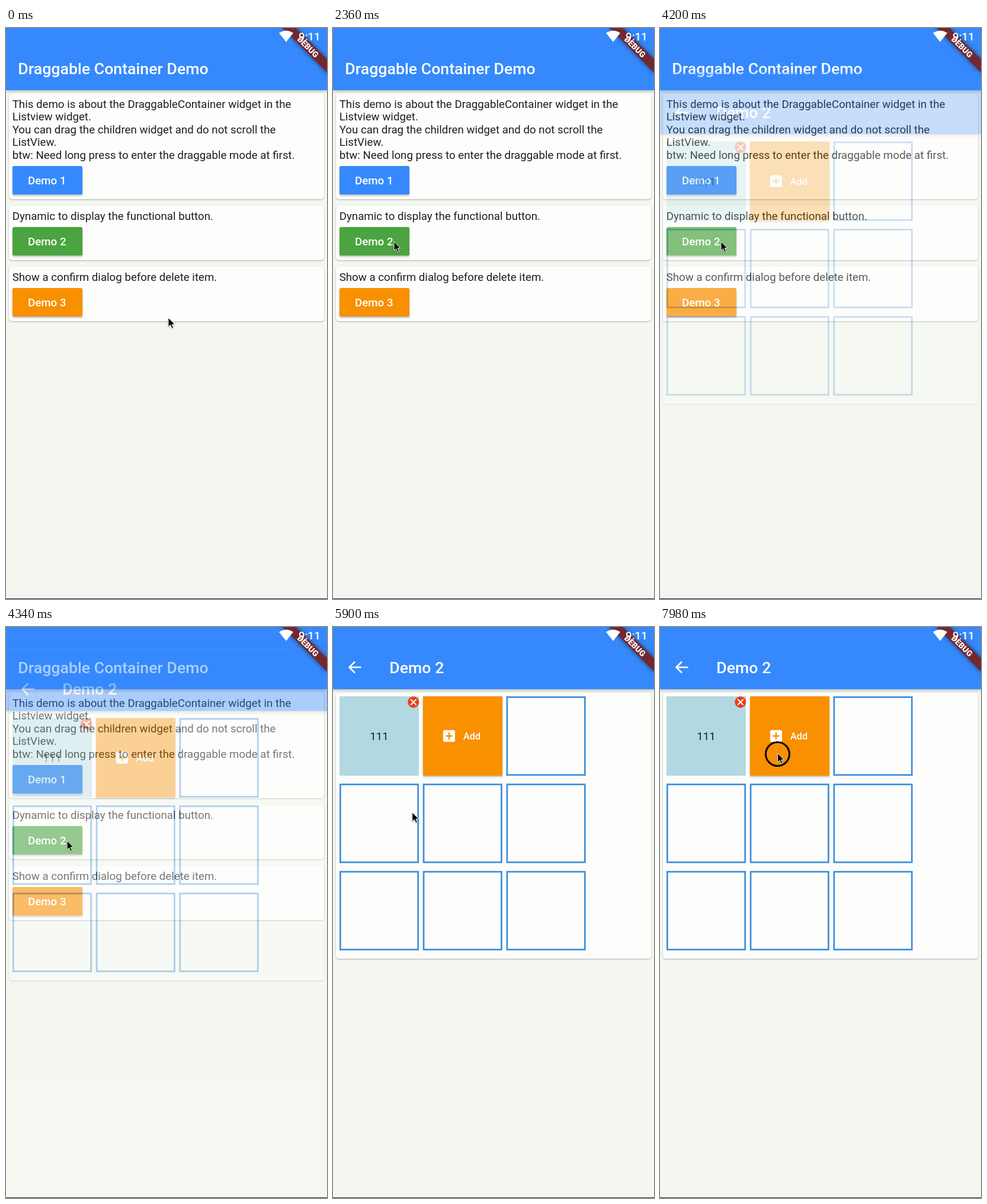
Write an HTML page that moves like this. It is 542 by 964 pixels and loops after 8 s.

```html
<!DOCTYPE html>
<html lang="en">
<head>
<meta charset="utf-8">
<title>Draggable Container Demo</title>
<style>
  html, body { margin: 0; width: 100%; height: 100%; overflow: hidden; background: #f4f7ef; }
  svg { display: block; width: 542px; height: 964px; font-family: Roboto, sans-serif; }
  .page { fill: #f4f7ef; }
  .bar { fill: #3589fc; filter: drop-shadow(0 2px 2.5px rgba(0, 0, 0, .25)); }
  .card { fill: #fdfdfc; filter: drop-shadow(0 1px 1px rgba(0, 0, 0, .3)); }
  .raised { filter: drop-shadow(0 2px 1.5px rgba(0, 0, 0, .28)); }
  .title { font-size: 26.7px; font-weight: 500; fill: #fff; }
  .body { font-size: 18.72px; fill: #1f1f1c; }
  .label { font-size: 18.72px; font-weight: 500; fill: #fff; }
  .slot { fill: none; stroke: #3b8fdc; stroke-width: 2.7; }
  .banner { fill: #73282f; filter: drop-shadow(0 0 4px rgba(0, 0, 0, .5)); }
</style>
</head>
<body>
<svg viewBox="0 0 542 964">
  <defs>
    <clipPath id="buttonClip"><rect x="11" y="336" width="118" height="48" rx="2.6"/></clipPath>
  </defs>

  <g id="home">
    <rect class="page" width="542" height="964"/>
    <rect class="bar" width="542" height="105"/>
    <text class="title" x="20.3" y="77.5">Draggable Container Demo</text>
  </g>

  <g id="detail">
    <rect class="page" width="542" height="964"/>
    <rect class="bar" width="542" height="105"/>
    <path d="M47.5 68H28M37 58.5 27.5 68l9.5 9.5" fill="none" stroke="#fff" stroke-width="2.6"/>
    <text class="title" x="95.300" y="77.5">Demo 2</text>
    <rect class="card" x="5" y="111" width="532" height="449" rx="5"/>
    <rect x="11" y="117" width="134" height="134" fill="#b2d9e2"/>
    <text class="body" x="78" y="191" text-anchor="middle">111</text>
    <circle cx="135.8" cy="126.8" r="9.6" fill="#e5421f"/>
    <path d="M131 122l9.6 9.6M140.600 122l-9.6 9.6" stroke="#fff" stroke-width="1.9"/>
    <rect class="raised" x="152" y="117" width="134" height="134" fill="#f89000"/>
    <rect x="186" y="174" width="20" height="20" rx="2.5" fill="#fff"/>
    <path d="M190.500 184h11M196 178.500v11" stroke="#f89000" stroke-width="2.4"/>
    <text x="220" y="190" font-size="16.2" font-weight="500" fill="#fff">Add</text>
  </g>

  <rect y="963" width="542" height="1" fill="#222"/>

  <g transform="translate(542 0) rotate(45)">
    <rect class="banner" x="-53.6" y="37.2" width="107.2" height="16"/>
    <text y="50.1" text-anchor="middle" font-size="13.7" font-weight="900" fill="#fff">DEBUG</text>
  </g>
  <path d="M461 8.500Q473 .5 485 8.500L473 23.500Z" fill="#fff"/>
  <text x="494" y="21" font-size="18.7" font-weight="500" fill="#fff">9:11</text>

  <g id="pointer">
    <circle id="press" cx="0" cy="1.500" r="20" fill="none" stroke="#000" stroke-width="3"/>
    <path d="M0 0V15.500L3.600 12.200 6.200 18 8.700 16.900 6.200 11.300H11Z"
      fill="#000" stroke="#fff" stroke-width="1" style="filter: drop-shadow(0 1px 1px rgba(0,0,0,.3))"/>
  </g>
</svg>

<script>
const LOOP = 8000;
const byId = id => document.getElementById(id);

function add(parent, tag, attrs, text) {
  const node = document.createElementNS(parent.namespaceURI, tag);
  for (const key in attrs) node.setAttribute(key, attrs[key]);
  if (text) node.textContent = text;
  return parent.appendChild(node);
}

const cards = [
  { y: 111, height: 178, color: '#3589fc', lines: [
    'This demo is about the DraggableContainer widget in the',
    'Listview widget.',
    'You can drag the children widget and do not scroll the',
    'ListView.',
    'btw: Need long press to enter the draggable mode at first.'] },
  { y: 300, height: 92, color: '#4aa43f', lines: ['Dynamic to display the functional button.'] },
  { y: 403, height: 92, color: '#f89000', lines: ['Show a confirm dialog before delete item.'] }
];

const home = byId('home');
let ripple;
cards.forEach(({ y, height, color, lines }, i) => {
  add(home, 'rect', { class: 'card', x: 5, y, width: 532, height, rx: 5 });
  lines.forEach((line, k) => add(home, 'text', { class: 'body', x: 10.7, y: y + 24 + k * 21.4 }, line));
  const top = y + height - 56;
  add(home, 'rect', { class: 'raised', x: 11, y: top, width: 118, height: 48, rx: 2.6, fill: color });
  if (i === 1) {
    const clip = add(home, 'g', { 'clip-path': 'url(#buttonClip)' });
    ripple = add(clip, 'circle', { cx: 103, cy: 361, fill: '#fff' });
  }
  add(home, 'text', { class: 'label', x: 69.3, y: top + 30.7, 'text-anchor': 'middle' }, `Demo ${i + 1}`);
});

const detail = byId('detail');
for (let i = 2; i < 9; i++) {
  add(detail, 'rect', {
    class: 'slot', x: 12.3 + (i % 3) * 140.8, y: 118.4 + Math.floor(i / 3) * 147.4, width: 131.4, height: 131.4
  });
}

const progress = (n, from, to) => Math.min(1, Math.max(0, (n - from) / (to - from)));
const smooth = u => u * u * (3 - 2 * u);

// cubic-bezier(.4, 0, .2, 1)
function fastOutSlowIn(x) {
  let low = 0, high = 1;
  for (let i = 0; i < 20; i++) {
    const s = (low + high) / 2;
    const at = 1.2 * s * (1 - s) ** 2 + 0.6 * s * s * (1 - s) + s ** 3;
    if (at < x) low = s; else high = s;
  }
  return smooth(low);
}

// Ticks come in threes, held for 20, 100 and 20 ms.
function tickAt(time) {
  const rest = time % 140;
  return 3 * Math.floor(time / 140) + (rest < 20 ? 0 : rest < 120 ? 1 : 2);
}

const stops = [[274, 489], [103, 360.5], [198.5, 213]];

function draw(time) {
  const n = tickAt(time);

  const first = smooth(progress(n, 4, 42));
  const second = smooth(progress(n, 116, 145));
  const [x, y] = [0, 1].map(k =>
    stops[0][k] + (stops[1][k] - stops[0][k]) * first + (stops[2][k] - stops[1][k]) * second);
  byId('pointer').setAttribute('transform', `translate(${x} ${y})`);
  const pressed = (n >= 72 && n < 80) || n >= 167;
  byId('press').setAttribute('visibility', pressed ? 'visible' : 'hidden');

  ripple.setAttribute('r', 12 * progress(n, 75, 79) + 90 * progress(n, 79, 88));
  ripple.setAttribute('opacity', 0.13 * progress(n, 74, 77) * (1 - progress(n, 84, 96)));

  const shown = progress(n, 79.4, 103.4);
  detail.setAttribute('transform', `translate(0 ${241 * (1 - fastOutSlowIn(shown))})`);
  detail.setAttribute('opacity', shown ** 1.6);
}

const start = performance.now();
function loop() {
  draw((performance.now() - start) % LOOP);
  requestAnimationFrame(loop);
}
loop();
</script>
</body>
</html>
```
